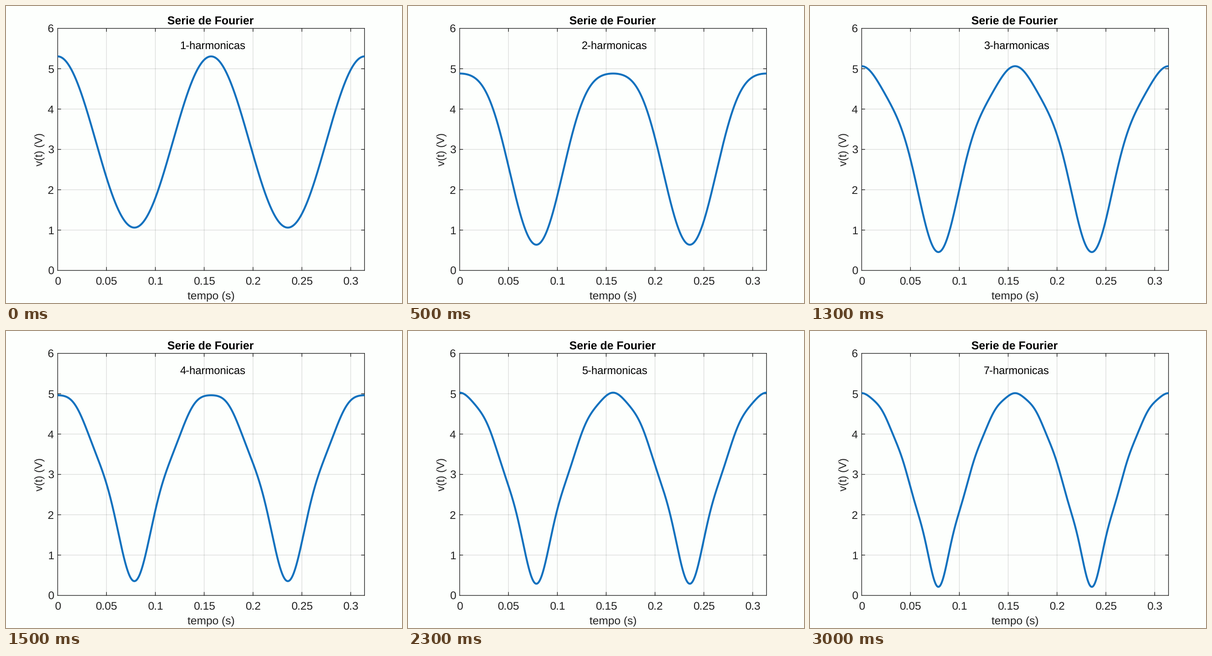
A matplotlib script for the animation above (3500 ms loop, 864 by 648 pixels).

```python
import numpy as np
import matplotlib
import matplotlib.pyplot as plt
from matplotlib.animation import FuncAnimation

matplotlib.rcParams.update({
    "font.family": "Liberation Sans",
    "text.hinting": "none",
    "toolbar": "None",
})

W, H, DPI = 864, 648, 72
LEFT, RIGHT, TOP, BOTTOM = 112.7, 782.3, 48.8, 576.9
T_MAX, V_MAX = np.pi / 10, 6
INK = "#212121"
TICK = 6.7
HARMONICS = 7

fig = plt.figure(figsize=(W / DPI, H / DPI), dpi=DPI, facecolor="#fdfffd")
ax = fig.add_axes([0, 0, 1, 1])
ax.set_xlim(0, W)
ax.set_ylim(H, 0)
ax.axis("off")


def px(t):
    return LEFT + t / T_MAX * (RIGHT - LEFT)


def py(v):
    return BOTTOM - v / V_MAX * (BOTTOM - TOP)


def segment(x0, y0, x1, y1, alpha=1.0, z=2):
    ax.plot([x0, x1], [y0, y1], color=INK, lw=1.4, alpha=alpha, zorder=z,
            solid_capstyle="projecting" if alpha == 1 else "butt", snap=False)


def label(x, y, text, size=24.4, color=INK, ha="center", **kw):
    return ax.text(x, y, text, fontsize=size, color=color, ha=ha,
                   va="baseline", zorder=4, **kw)


def fourier(t, count):
    """Partial sum for a full-wave rectified cosine of 5 V."""
    v = np.full_like(t, 10 / np.pi)
    for n in range(1, count + 1):
        v -= 20 / np.pi * (-1) ** n / (4 * n * n - 1) * np.cos(40 * n * t)
    return v


# Grid, ticks and tick labels
for i in range(7):
    t = i * 0.05
    x = px(t)
    if i:
        segment(x, TOP, x, BOTTOM, alpha=0.15, z=1)
        segment(x, TOP, x, TOP + TICK)
        segment(x, BOTTOM, x, BOTTOM - TICK)
    label(x, 609, f"{t:.2g}")

for v in range(V_MAX + 1):
    y = py(v)
    if 0 < v < V_MAX:
        segment(LEFT, y, RIGHT, y, alpha=0.15, z=1)
        segment(LEFT, y, LEFT + TICK, y)
        segment(RIGHT, y, RIGHT - TICK, y)
    label(104.3, y + 8.8, str(v), ha="right")

# Frame
for y in (TOP, BOTTOM):
    segment(LEFT, y, RIGHT, y)
for x in (LEFT, RIGHT):
    segment(x, TOP, x, BOTTOM)

label(446.7, 40, "Serie de Fourier", 24.7, "black", weight="bold")
label(447, 640, "tempo (s)")
label(80, 313, "v(t) (V)", 23.6, rotation=90, rotation_mode="anchor")
caption = label(px(0.125), 93.4, "", 23.6, "black", ha="left")

time = np.linspace(0, T_MAX, 1200)
curve, = ax.plot([], [], color="#1171be", lw=4.2, zorder=3,
                 solid_capstyle="butt", solid_joinstyle="round")


def update(i):
    count = i % HARMONICS + 1
    curve.set_data(px(time), py(fourier(time, count)))
    caption.set_text(f"{count}-harmonicas")
    return curve, caption


anim = FuncAnimation(fig, update, frames=HARMONICS, interval=500,
                     repeat=True, repeat_delay=0, blit=False)
plt.show()
```
